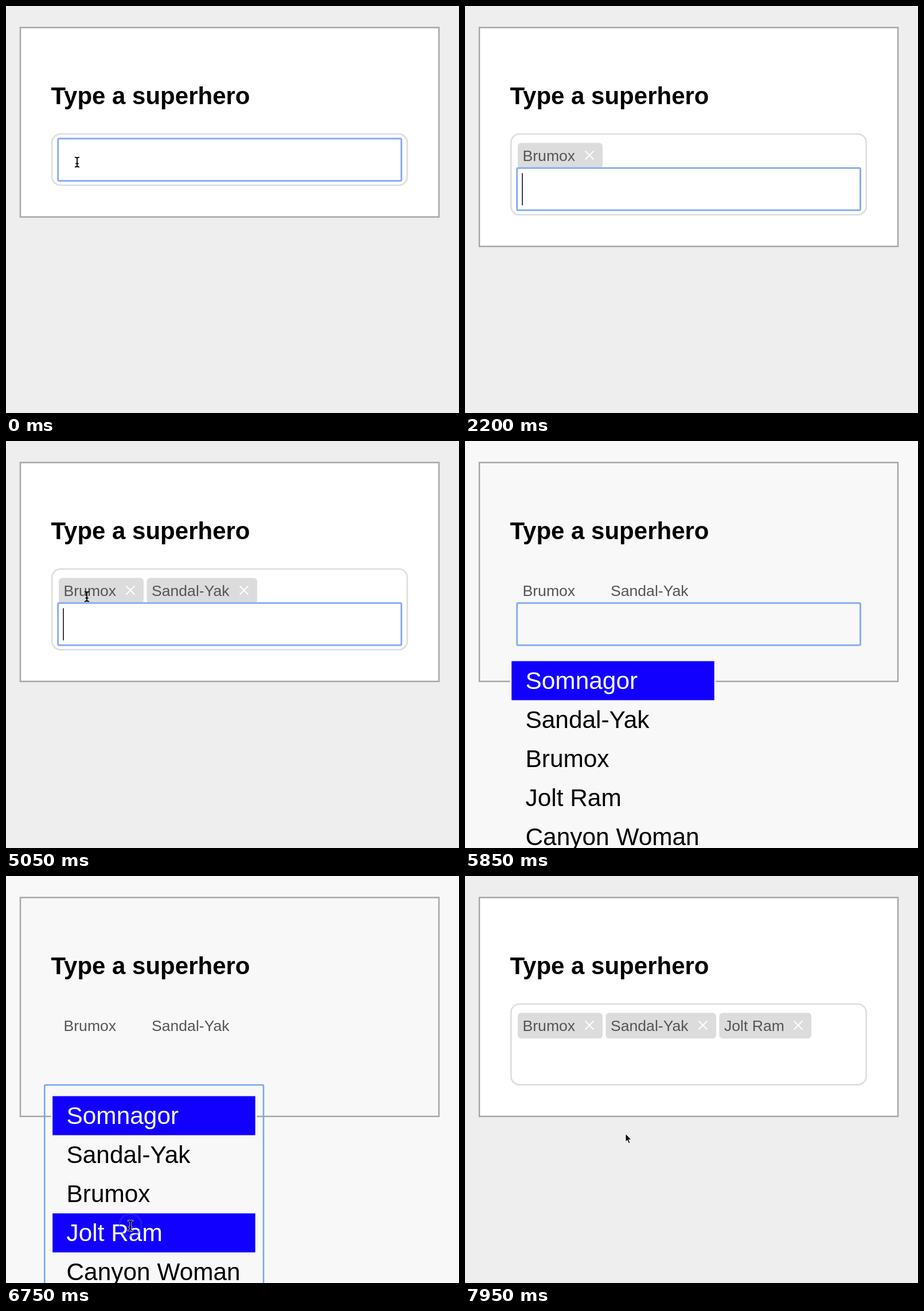
Animation, 790 px wide and 709 px high, one loop 8 s. Source, as an HTML page:

```html
<!DOCTYPE html>
<html lang="en">
<head>
<meta charset="utf-8">
<title>Type a superhero</title>
<style>
  html, body { margin: 0; width: 100%; height: 100%; overflow: hidden; }
  svg {
    --bg: #eee; --card: #fff; --line: #ddd; --chip: #dcdcdc; --cross: #fff;
    display: block; width: 790px; height: 709px; background: var(--bg);
    font-family: "Liberation Sans", Arial, sans-serif;
  }
  svg.filtered { --bg: #ececec; --line: #eaeaea; --chip: #eaeaea; }
  svg.full { --bg: #f8f8f8; --card: #f8f8f8; --line: #f8f8f8; --chip: #f8f8f8; --cross: #f8f8f8; }
  #card { fill: var(--card); stroke: #a6a6a6; stroke-width: 2.5; }
  #wrap { fill: var(--card); stroke: var(--line); stroke-width: 2.6; }
  #field { fill: var(--card); stroke: #86aef3; stroke-width: 3; }
  #focus { fill: none; stroke: #7aa5ee; stroke-width: 2.6; }
  #panel { fill: var(--card); stroke: var(--line); stroke-width: 2.6; }
  #title { font-size: 42px; font-weight: bold; }
  #typed { font-size: 47.2px; }
  .chip rect { fill: var(--chip); }
  .chip text { font-size: 26.6px; fill: #555; }
  .chip path { stroke: var(--cross); stroke-width: 2; }
  .row text { font-size: 42.4px; }
  .row rect { fill: none; }
  .row.on rect { fill: #1200ff; }
  .row.on text { fill: #fff; }
</style>
</head>
<body>
<svg id="stage" viewBox="0 0 790 709">
  <rect id="card" x="25" y="37.5" width="730"/>
  <text id="title" x="78.5" y="171">Type a superhero</text>
  <rect id="wrap" x="80.2" y="223" width="619.6" rx="15"/>
  <g id="chips"></g>
  <g id="entry">
    <rect id="field" x="90.7" y="231" width="598.8" height="73.5" rx="2"/>
    <text id="typed" x="99" y="288"></text>
    <rect id="caret" y="240" width="1.5" height="56"/>
  </g>
  <g id="menu">
    <rect id="panel" x="80" y="377"/>
    <g id="rows"></g>
    <rect id="focus" x="67.3" y="364" width="381.8" height="400" rx="2"/>
  </g>
  <circle id="ring" cx="217" cy="608" fill="none" stroke="#2a3ee0" stroke-width="2.5"/>
  <g id="beam" fill="none" stroke-linecap="round">
    <path id="beamShape" stroke="#fff" stroke-width="3" d="M-3.5-8.5Q0-8.5 0-6Q0-8.5 3.5-8.5M0-6V6M-3.5 8.5Q0 8.5 0 6Q0 8.5 3.5 8.5M-2 2.5H2"/>
    <use href="#beamLine"/>
    <path id="beamLine" stroke="#000" stroke-width="1.4" d="M-3.5-8.5Q0-8.5 0-6Q0-8.5 3.5-8.5M0-6V6M-3.5 8.5Q0 8.5 0 6Q0 8.5 3.5 8.5M-2 2.5H2"/>
  </g>
  <path id="arrow" stroke="#fff" stroke-width="1" d="M0 0V14.2L3.2 11.3L5.5 16.8L7.9 15.8L5.6 10.4H10.1Z"/>
</svg>
<script>
const LOOP = 8000, ROW = 68.05;
const HEROES = ["Somnagor", "Sandal-Yak", "Brumox", "Jolt Ram", "Canyon Woman"];
const $ = id => document.getElementById(id);
const set = (el, attrs) => { for (const k in attrs) el.setAttribute(k, attrs[k]); };
const show = (el, on) => { el.style.display = on ? "" : "none"; };
const within = (t, a, b) => t >= a && t < b;

// name, left, right, time it is added
const chips = [
  ["Brumox", 92, 240, 2200],
  ["Sandal-Yak", 245.5, 438, 4000],
  ["Jolt Ram", 443.5, 604, 6850]
].map(([name, left, right, from]) => {
  $("chips").insertAdjacentHTML("beforeend", `<g class="chip">
    <rect x="${left}" y="238.5" width="${right - left}" height="44.5" rx="6"/>
    <text x="${left + 8.5}" y="269.5">${name}</text>
    <path d="M${right - 30.5} 252.5l15 15m0-15l-15 15"/></g>`);
  return { el: $("chips").lastChild, from };
});

// the menus that open: time span, width, entries, typed text
const menus = [
  { from: 900, to: 2200, width: 200, typed: "b", names: ["Brumox"], pick: 0, pickAt: 1700 },
  { from: 2650, to: 4000, width: 271, typed: "s", look: "filtered",
    names: ["Somnagor", "Sandal-Yak", "The Trusk", "Stelm"], pick: 1, pickAt: 3400 },
  { from: 5300, to: 6850, width: 356, typed: "", look: "full", names: HEROES, pick: 0, pickAt: 5300 }
];

// caret: [time, visible]
const blinks = [[0, 0], [350, 1], [1400, 0], [1900, 1], [2700, 1], [3150, 0], [3650, 1],
  [4500, 0], [5000, 1], [5500, 0], [6000, 1], [6500, 0]];

// pointer moves: start, end, from, to
const moves = [
  [0, 900, [124, 272], [124, 272]],
  [4650, 4800, [126, 270], [141, 271]],
  [5900, 6500, [141, 271], [217, 609]],
  [7200, 7550, [217, 606], [280, 449]]
];

function pointerAt(t) {
  const [a, b, p, q] = moves.filter(m => m[0] <= t).pop();
  const u = Math.min(1, (t - a) / (b - a));
  const e = u * u * (3 - 2 * u);
  return p.map((v, i) => v + (q[i] - v) * e);
}

let current;
function fillMenu(menu) {
  if (menu === current) return;
  current = menu;
  $("rows").innerHTML = menu ? menu.names.map((name, i) => `<g class="row">
    <rect x="81.2" y="${383.5 + i * ROW}" width="${menu.width - 2.5}" height="68"/>
    <text x="105.5" y="${432 + i * ROW}">${name}</text></g>`).join("") : "";
}

function draw(t) {
  const menu = menus.find(m => within(t, m.from, m.to));
  const tall = t >= 2200;
  const shift = tall ? 51.3 : 0;
  const [px, py] = pointerAt(t);
  const pressed = t >= 6700;

  $("stage").setAttribute("class", menu && menu.look || "");
  set($("card"), { height: 330 + shift });
  set($("wrap"), { height: 89.3 + shift });
  chips.forEach(c => show(c.el, t >= c.from));

  set($("entry"), { transform: `translate(0 ${shift})` });
  show($("entry"), !pressed);
  const typed = menu ? menu.typed : "";
  $("typed").textContent = typed;
  set($("caret"), { x: 99.3 + { "": 0, s: 23.4, b: 26 }[typed] });
  show($("caret"), blinks.filter(b => b[0] <= t).pop()[1]);

  show($("menu"), menu);
  fillMenu(menu);
  if (menu) {
    const hover = t >= 5900 ? Math.floor((py - 383.5) / ROW) : -1;
    set($("menu"), { transform: `translate(0 ${shift - 51.3})` });
    set($("panel"), { width: menu.width, height: menu.names.length * ROW + 12 + (menu.look === "full" ? 200 : 0) });
    [...$("rows").children].forEach((row, i) =>
      row.classList.toggle("on", i === hover || i === menu.pick && t >= menu.pickAt));
    show($("focus"), pressed);
  }

  const age = (t - 6650) / 200;
  show($("ring"), within(age, 0, 1));
  set($("ring"), { r: 10 + 18 * Math.max(0, age), opacity: Math.max(0, 1 - age) });

  const arrow = t >= 6850;
  show($("arrow"), arrow);
  show($("beam"), !arrow && (t < 900 || within(t, 4650, 5300) || t >= 5900));
  set($("beam"), { transform: `translate(${px} ${py})` });
  show($("beamShape"), menu);
  set($("arrow"), { transform: `translate(${px} ${py})` });
}

const start = performance.now();
function tick() {
  draw((performance.now() - start) % LOOP);
  requestAnimationFrame(tick);
}
tick();
</script>
</body>
</html>
```
